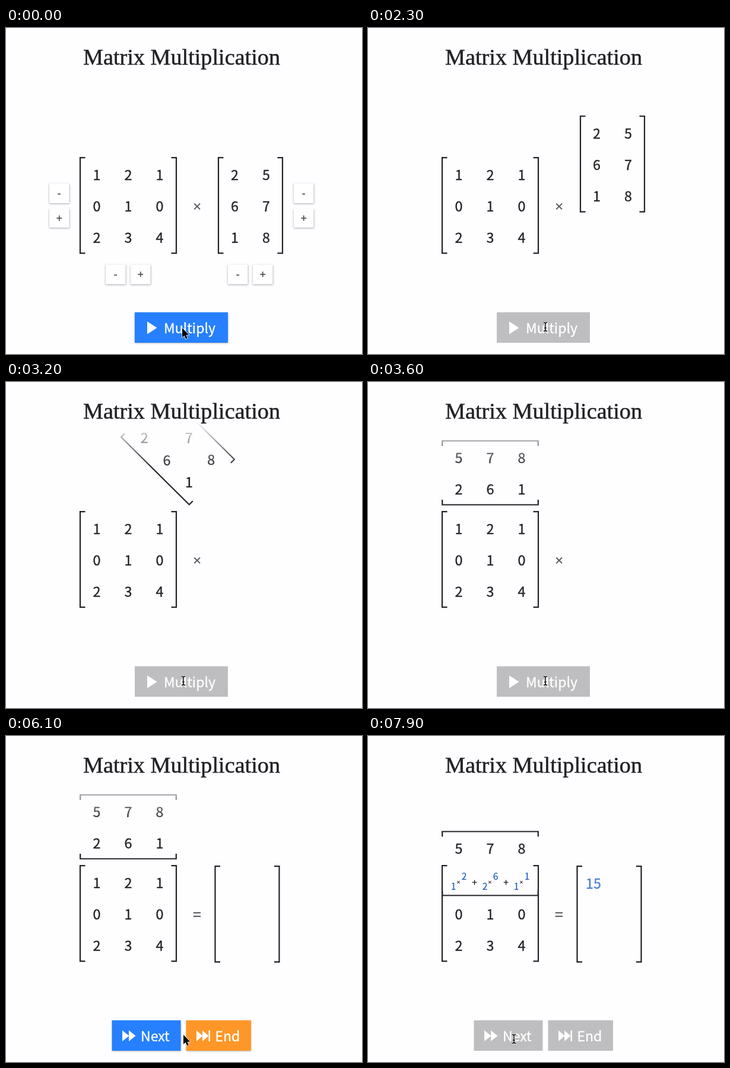
Animation, 600 px wide and 551 px high, one loop 8 s. Source, as an HTML page with a canvas:

```html
<!DOCTYPE html>
<html lang="en">
<head>
<meta charset="utf-8">
<title>Matrix Multiplication</title>
<style>
html, body { margin: 0; width: 100%; height: 100%; overflow: hidden; background: #fefdff; }
canvas { display: block; width: 600px; height: 551px; }
</style>
</head>
<body>
<canvas id="stage"></canvas>
<script>
const W = 600, H = 551, LOOP = 8000;
const SANS = '"Noto Sans CJK SC", "Noto Sans CJK JP", "Noto Sans", sans-serif';
const OPS = '"Open Sans", "Noto Sans", sans-serif';
const SERIF = '"Liberation Serif", "Times New Roman", serif';
const PAPER = [254, 253, 255], INK = [34, 34, 36], BLUE = [38, 128, 255],
  HOVER = [80, 155, 255], ORANGE = [255, 151, 40], GREY = [190, 189, 191], TERM = [31, 96, 184];
const A = [[1, 2, 1], [0, 1, 0], [2, 3, 4]];
const B = [[2, 5], [6, 7], [1, 8]];
const MID = 299.9, ARM = 92;

const canvas = document.getElementById('stage');
const ctx = canvas.getContext('2d');
const ratio = window.devicePixelRatio || 1;
canvas.width = W * ratio;
canvas.height = H * ratio;

const rgb = (c, a = 1) => `rgba(${c[0]},${c[1]},${c[2]},${a})`;
const lerp = (a, b, p) => a + (b - a) * p;
const mix = (a, b, p) => a.map((v, i) => Math.round(lerp(v, b[i], p)));
const ramp = (t, from, to) => Math.min(1, Math.max(0, (t - from) / (to - from)));
const ease = p => (1 - Math.cos(Math.PI * p)) / 2;
const glide = (t, from, to) => ease(ramp(t, from, to));

// A hairline outline gives the type a slightly heavier weight.
function text(str, x, y, size, color, family = SANS, align = 'center') {
  ctx.font = `${size}px ${family}`;
  ctx.textAlign = align;
  ctx.fillStyle = ctx.strokeStyle = color;
  ctx.lineWidth = size / 70;
  ctx.lineJoin = 'round';
  ctx.fillText(str, x, y);
  ctx.strokeText(str, x, y);
}

// Text centred vertically on y: digits and operators differ in height.
const digit = (v, x, y, size = 23.3, color = rgb(INK)) => text(v, x, y + size * 0.365, size, color);
const op = (v, x, y, size, color) => text(v, x, y + size * 0.36, size, color, v === '×' ? OPS : SANS);

function faded(alpha, draw) {
  if (alpha <= 0) return;
  ctx.save();
  ctx.globalAlpha *= alpha;
  draw();
  ctx.restore();
}

function brackets(halfW, halfH) {
  ctx.strokeStyle = rgb(INK);
  ctx.lineWidth = 2.2;
  ctx.lineJoin = 'miter';
  ctx.beginPath();
  for (const s of [-1, 1]) {
    const x = s * halfW, tip = s * (halfW - 8.5);
    ctx.moveTo(tip, -halfH);
    ctx.lineTo(x, -halfH);
    ctx.lineTo(x, halfH);
    ctx.lineTo(tip, halfH);
  }
  ctx.stroke();
}

function bracketsAt(x, y, halfW, halfH, angle = 0) {
  ctx.save();
  ctx.translate(x, y);
  ctx.rotate(angle);
  brackets(halfW, halfH);
  ctx.restore();
}

function box(x, y, w, h, fill, shadow) {
  ctx.save();
  ctx.shadowColor = `rgba(0,0,0,${shadow})`;
  ctx.shadowBlur = 3 * ratio;
  ctx.shadowOffsetY = ratio;
  ctx.fillStyle = fill;
  ctx.fillRect(x, y, w, h);
  ctx.restore();
}

function sizeButton(label, x, y) {
  box(x, y, 33.5, 33, '#fff', 0.35);
  op(label, x + 16.7, y + 17, 18, '#444');
}

function triangle(x, y, w, h) {
  ctx.beginPath();
  ctx.moveTo(x, y);
  ctx.lineTo(x + w, y + h / 2);
  ctx.lineTo(x, y + h);
  ctx.fill();
}

function button(label, x, w, textX, color, off) {
  box(x, 480.5, w, 51.5, rgb(mix(color, GREY, off)), 0.35 * (1 - off));
  text(label, textX, 515.5, 23, '#fff', SANS, 'left');
  if (label === 'Multiply') triangle(238, 496, 16.5, 21.5);
  else {
    const left = label === 'Next' ? 196 : 321;
    const step = label === 'Next' ? 11 : 10;
    triangle(left, 497.5, step + 0.5, 18.5);
    triangle(left + step, 497.5, step + 0.5, 18.5);
    if (label === 'End') ctx.fillRect(341.5, 497.5, 2.5, 18.5);
  }
}

function matrixA(slide) {
  bracketsAt(206, MID, 81, 80.8);
  A.forEach((row, r) => row.forEach((v, c) => {
    const x = 153 + 53 * c, y = 248 + 53 * r;
    if (r) digit(v, x, y);
    else digit(v, lerp(x, x - 9, slide), lerp(y, 254, slide), lerp(23.3, 15.5, slide), rgb(mix(INK, TERM, slide)));
  }));
}

function matrixB(t, slide) {
  const lift = glide(t, 1970, 2770), turn = glide(t, 2800, 3600);
  const angle = -turn * Math.PI / 2;
  const cos = Math.cos(angle), sin = Math.sin(angle);
  // The pivot lies below the matrix, ARM away from its centre.
  const px = lerp(412, 206 + ARM, turn);
  const py = lerp(MID + ARM - 191.5 * lift, 153.5, turn);
  const cx = px + ARM * sin, cy = py - ARM * cos + 62 * slide;
  bracketsAt(cx, cy, 54, 80.8, angle);
  B.forEach((row, r) => row.forEach((v, c) => {
    const dx = (c - 0.5) * 53, dy = (r - 1) * 53;
    const x = cx + dx * cos - dy * sin, y = cy + dx * sin + dy * cos + 1.3;
    if (c) digit(v, x, y);
    else digit(v, lerp(x, x + 9, slide), lerp(y, y - 5.5, slide), lerp(23.3, 15.5, slide), rgb(mix(INK, TERM, slide)));
  }));
}

function topFade() {
  const g = ctx.createLinearGradient(0, 66, 0, 145);
  g.addColorStop(0, rgb(PAPER));
  g.addColorStop(1, rgb(PAPER, 0));
  ctx.fillStyle = g;
  ctx.fillRect(0, 0, W, 145);
}

function poly(points) {
  ctx.beginPath();
  points.forEach(([x, y]) => ctx.lineTo(x, y));
  ctx.closePath();
}

const shapes = {
  arrow() {
    poly([[0, 0], [0, 16], [3.6, 12.7], [6.2, 18.6], [8.9, 17.4], [6.4, 11.8], [11.4, 11.8]]);
    ctx.fillStyle = '#000';
    ctx.strokeStyle = '#fff';
    ctx.lineWidth = 1.5;
    ctx.lineJoin = 'round';
    ctx.stroke();
    ctx.fill();
  },
  hand() {
    ctx.beginPath();
    ctx.moveTo(-1.6, 11);
    ctx.lineTo(-1.6, 2);
    ctx.quadraticCurveTo(0, -1, 1.6, 2);
    ctx.lineTo(1.8, 7);
    ctx.quadraticCurveTo(3.8, 5, 4.8, 7.4);
    ctx.quadraticCurveTo(7, 5.8, 7.8, 8.2);
    ctx.quadraticCurveTo(10.4, 7.2, 10.6, 10);
    ctx.quadraticCurveTo(10.4, 14, 8.4, 17.5);
    ctx.lineTo(0.6, 17.5);
    ctx.quadraticCurveTo(-1.5, 14, -4.8, 10.6);
    ctx.quadraticCurveTo(-4.6, 7.8, -1.6, 10);
    ctx.closePath();
    ctx.fillStyle = '#fff';
    ctx.strokeStyle = '#111';
    ctx.lineWidth = 1.3;
    ctx.fill();
    ctx.stroke();
    ctx.beginPath();
    for (const x of [1.8, 4.6, 7.4]) {
      ctx.moveTo(x, 11.5);
      ctx.lineTo(x, 15);
    }
    ctx.lineWidth = 1;
    ctx.stroke();
  },
  beam() {
    for (const [color, width] of [['rgba(255,255,255,.8)', 3], ['#111', 1.5]]) {
      ctx.beginPath();
      for (const s of [-1, 1]) {
        ctx.moveTo(-3.2, 7.5 * s);
        ctx.quadraticCurveTo(0, 7.5 * s, 0, 5 * s);
        ctx.quadraticCurveTo(0, 7.5 * s, 3.2, 7.5 * s);
      }
      ctx.moveTo(0, -6);
      ctx.lineTo(0, 6);
      ctx.moveTo(-1.8, 2);
      ctx.lineTo(1.8, 2);
      ctx.strokeStyle = color;
      ctx.lineWidth = width;
      ctx.stroke();
    }
  }
};

function cursor(t) {
  const enter = glide(t, 0, 300), back = glide(t, 1400, 1800), move = glide(t, 6400, 6900);
  const x = lerp(lerp(297, 299, back), 246, move);
  const y = lerp(lerp(lerp(507, 514, enter), 505, back), 512, move);
  let kind = 'arrow';
  if (t >= 100 && t < 1900) kind = 'hand';
  else if (t >= 1900 && t < 3700 || t >= 7300) kind = 'beam';
  else if (t >= 6400 && x < 294) kind = 'hand';
  ctx.save();
  ctx.translate(x, y);
  shapes[kind]();
  ctx.restore();
}

function products(show) {
  faded(show, () => {
    for (let c = 0; c < 3; c++) {
      op('×', 152.5 + 53 * c, 247, 11, rgb(INK));
      if (c) op('+', 126.5 + 53 * c, 247.5, 15.5, rgb(INK));
    }
  });
}

function draw(t) {
  ctx.setTransform(ratio, 0, 0, ratio, 0, 0);
  ctx.fillStyle = rgb(PAPER);
  ctx.fillRect(0, 0, W, H);

  const slide = glide(t, 7250, 7800);
  matrixB(t, slide);
  topFade();
  matrixA(slide);
  products(ramp(t, 7550, 7800));

  text('Matrix Multiplication', 296, 62, 38.2, rgb(INK), SERIF);

  faded(1 - ramp(t, 1900, 2150), () => {
    for (const x of [73, 485]) {
      sizeButton('-', x, 263);
      sizeButton('+', x, 304.5);
    }
    for (const x of [168, 374]) {
      sizeButton('-', x, 400);
      sizeButton('+', x + 42, 400);
    }
  });

  const solved = t >= 3700;
  op(solved ? '=' : '×', 322, 301.5, solved ? 25 : 24, '#5a5a5c');
  faded(ramp(t, 3650, 4280), () => bracketsAt(406.5, 301, 54, 80.8));
  faded(ramp(t, 7650, 7960), () => digit('15', 380, 249, 23.3, rgb([38, 105, 200])));

  if (!solved) {
    button('Multiply', 217, 157, 266, mix(BLUE, HOVER, ramp(t, 50, 250)), ramp(t, 1880, 2080));
  } else {
    const off = ramp(t, 7250, 7450);
    button('Next', 178.5, 116, 227, mix(BLUE, HOVER, ramp(t, 6550, 6750)), off);
    button('End', 303.5, 109.5, 352.5, ORANGE, off);
  }
  cursor(t);
}

function tick() {
  draw(performance.now() % LOOP);
  requestAnimationFrame(tick);
}
tick();
</script>
</body>
</html>
```
